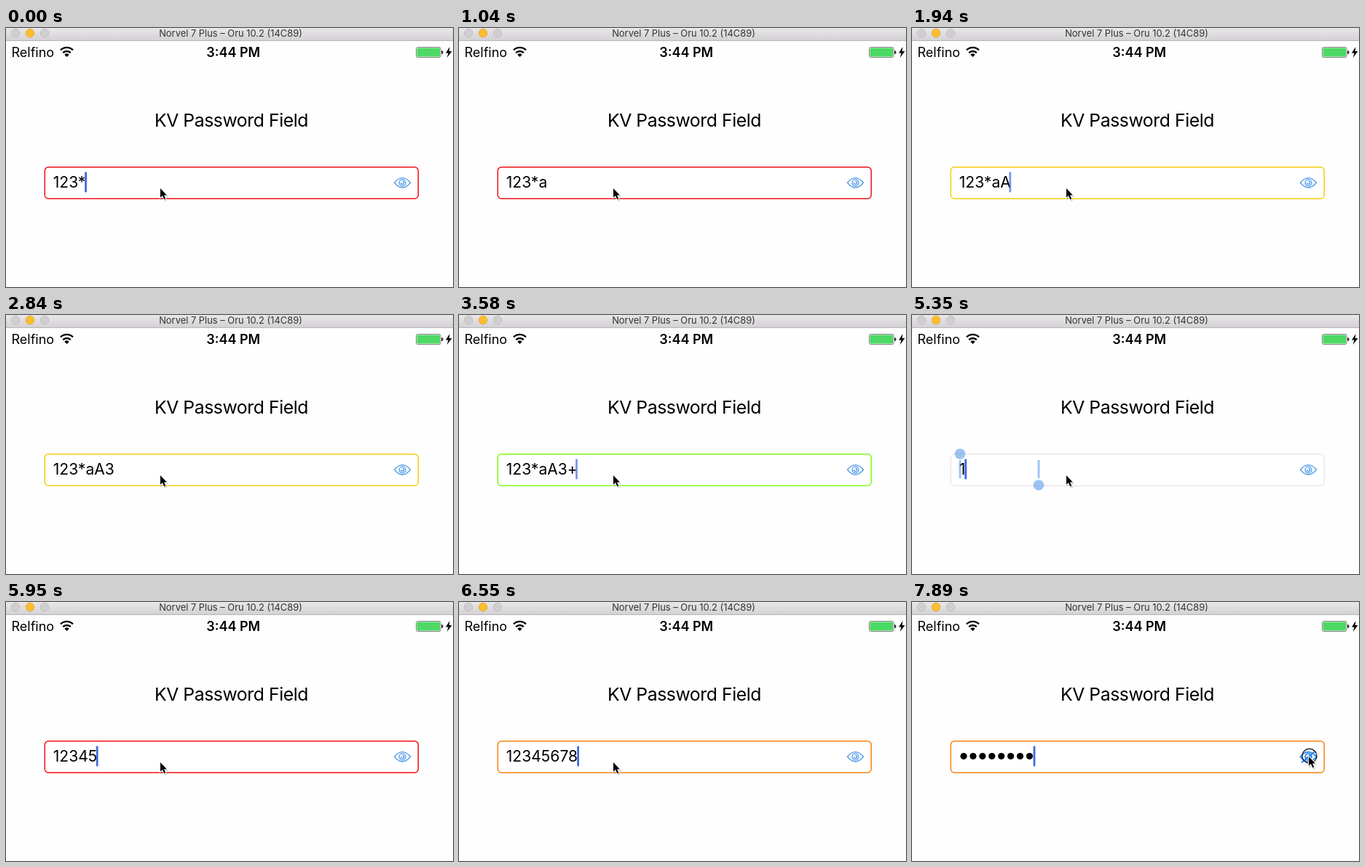
Write an HTML page that moves like this. It is 614 by 357 pixels and loops after 8 s.

```html
<!DOCTYPE html>
<html lang="en">
<head>
<meta charset="utf-8">
<title>Password field demo</title>
<style>
  html, body { margin: 0; width: 100%; height: 100%; overflow: hidden; background: #fefefe; }
  svg { display: block; width: 614px; height: 357px; }
  text { font-family: Inter, "Open Sans", sans-serif; }
  .middle { text-anchor: middle; }
  #value { font-variant-ligatures: no-contextual; white-space: pre; }
</style>
</head>
<body>
<svg viewBox="0 0 614 357">
  <defs>
    <linearGradient id="bar" x2="0" y2="1">
      <stop stop-color="#e9e7e9"/><stop offset="1" stop-color="#d3d1d3"/>
    </linearGradient>
  </defs>

  <!-- window bar -->
  <rect width="614" height="17" fill="url(#bar)"/>
  <rect y="17" width="614" height="1" fill="#b9b7b9"/>
  <g stroke-width=".7">
    <circle cx="13" cy="7" r="5.8" fill="#d0ced0" stroke="#b8b6b8"/>
    <circle cx="33" cy="7" r="5.8" fill="#fdbd2e" stroke="#e0a030"/>
    <circle cx="53" cy="7" r="5.8" fill="#d0ced0" stroke="#b8b6b8"/>
  </g>
  <text class="middle" x="308.5" y="12" font-size="12.9" fill="#333">Norvel 7 Plus – Oru 10.2 (14C89)</text>

  <!-- status bar -->
  <text x="7.5" y="40" font-size="18">Relfino</text>
  <path d="M83.5 40l-3.2-3.3a4.5 4.5 0 0 1 6.4 0z"/>
  <path d="M78.2 34.2a7.5 7.5 0 0 1 10.6 0M75 30.4a12 12 0 0 1 17 0" fill="none" stroke="#000" stroke-width="2.4"/>
  <text class="middle" x="312.2" y="40" font-size="18" font-weight="600">3:44 PM</text>
  <rect x="563.5" y="26.5" width="33.5" height="14" rx="2" fill="#fff" stroke="#777" stroke-width=".9"/>
  <rect x="564.5" y="27.5" width="31.5" height="12" rx="1" fill="#4cd964"/>
  <path d="M598 31a2.4 2.4 0 0 1 0 5z" fill="#333"/>
  <path d="M609.5 26l-5.5 8.4h3.5l-1.8 6.6 6.8-9h-3.8z"/>

  <text class="middle" x="309.5" y="135.5" font-size="24.8" letter-spacing="-.45">KV Password Field</text>

  <!-- password field -->
  <rect id="field" x="53.25" y="191.75" width="513" height="43.5" rx="5" fill="#fff" stroke-width="1.5"/>
  <rect id="selection" x="66" y="200" width="108" height="25" fill="#d3e3f8"/>
  <text id="value" x="64.7" y="220" font-size="21.1"></text>
  <g id="dots"></g>
  <g id="handles" fill="#3f8ae6">
    <rect x="64.5" y="200" width="3" height="25"/><circle cx="66" cy="191.5"/>
    <rect x="172.5" y="200" width="3" height="25"/><circle cx="174" cy="234.5"/>
  </g>
  <rect id="caret" y="198.5" width="2.8" height="28" rx="1" fill="#4169e1"/>
  <g id="eye" fill="none" stroke="#559de8">
    <path d="M533.5 213.3q11-13.4 22 0q-11 13.4-22 0z"/>
    <circle cx="544.5" cy="213.3" r="4.4"/>
    <path d="M544.5 211.2a2.1 2.1 0 1 1-2.1 2.1"/>
    <path id="slash" d="M535 221.5l19-16"/>
  </g>
  <circle id="ring" cx="546" cy="212.3" r="10" fill="none" stroke="#111" stroke-width="1.2"/>

  <g id="pointer">
    <path d="M0 0V14l3.2-3 2.3 5.2 2.4-1-2.2-5H10z" transform="translate(.8 1.2)" fill="#000" stroke="#000" opacity=".18"/>
    <path d="M0 0V12.8l2.9-2.7 2.4 5.3 2-.9-2.3-5H8.9z" stroke="#fff" stroke-width="1.8" paint-order="stroke"/>
  </g>
</svg>
<script>
const LOOP = 8000, FADED = 0.7;
const RED = '#f01018', YELLOW = '#f8ce0c', GREEN = '#80fa16', ORANGE = '#fa8212', GREY = '#dedede';
const $ = id => document.getElementById(id);

const typed = (text, x, more) => ({ text, x, caret: 1, ...more });
const fade = { caret: FADED }, off = { caret: 0 };

// Each step lists only what changes at its time.
const steps = [
  [0, typed('123*', 108.2, { border: RED, handles: 0, knob: 7.3, selected: false, hidden: false, ring: false, pointer: [212, 221] })],
  [300, typed('123*a', 120.2)],
  [890, fade], [1040, off], [1340, fade],
  [1490, typed('123*aA', 133.4, { border: YELLOW })],
  [1940, fade],
  [2090, typed('123*aA3', 147)],
  [2690, fade], [2840, off],
  [2980, typed('123*aA3+', 160.1, { border: GREEN })],
  [3580, fade], [3730, off],
  [4030, typed('123*aA3+d', 173.1, fade)],
  [4180, { caret: 1 }], [4630, fade], [4770, off],
  [4920, { handles: 1, knob: 8.3, selected: true }],
  [5060, { knob: 7.3 }],
  [5350, typed('1', 72.3, { border: GREY, handles: 0.5, selected: false })],
  [5500, typed('12', 84.5, { border: RED, handles: 0 })],
  [5650, typed('123', 97.3)],
  [5800, typed('1234', 111)],
  [5950, typed('12345', 123.8)],
  [6250, typed('123456', 136.8)],
  [6400, typed('1234567', 148.8)],
  [6550, typed('12345678', 162.2, { border: ORANGE })],
  [7150, fade],
  [7300, { caret: 0, pointer: [290, 222] }],
  [7450, { pointer: [440, 220] }],
  [7600, { caret: FADED, pointer: [530, 215] }],
  [7750, { caret: 1, pointer: [545, 213], ring: true }],
  [7890, { hidden: true, x: 166.6 }]
];

const svgNS = 'http://www.w3.org/2000/svg';
for (let i = 0; i < 8; i++) {
  const dot = document.createElementNS(svgNS, 'circle');
  dot.setAttribute('cx', 71 + i * 12.92);
  dot.setAttribute('cy', 212.5);
  dot.setAttribute('r', 4.6);
  $('dots').append(dot);
}

const show = (id, visible) => $(id).setAttribute('visibility', visible ? 'visible' : 'hidden');

function draw(time) {
  const s = Object.assign({}, ...steps.filter(([at]) => at <= time).map(([, change]) => change));
  $('value').textContent = s.hidden ? '' : s.text;
  $('field').setAttribute('stroke', s.border);
  $('field').setAttribute('stroke-width', s.border === GREY ? 1 : 1.5);
  $('caret').setAttribute('x', s.x);
  $('caret').setAttribute('opacity', s.caret);
  $('handles').setAttribute('opacity', s.handles);
  for (const knob of $('handles').querySelectorAll('circle')) knob.setAttribute('r', s.knob);
  $('eye').setAttribute('stroke', s.hidden ? '#2b86e6' : '#559de8');
  $('eye').setAttribute('stroke-width', s.hidden ? 1.9 : 1.4);
  $('pointer').setAttribute('transform', `translate(${s.pointer})`);
  show('selection', s.selected);
  show('dots', s.hidden);
  show('slash', s.hidden);
  show('ring', s.ring);
}

const start = performance.now();
function tick() {
  draw((performance.now() - start) % LOOP);
  requestAnimationFrame(tick);
}
tick();
</script>
</body>
</html>
```
